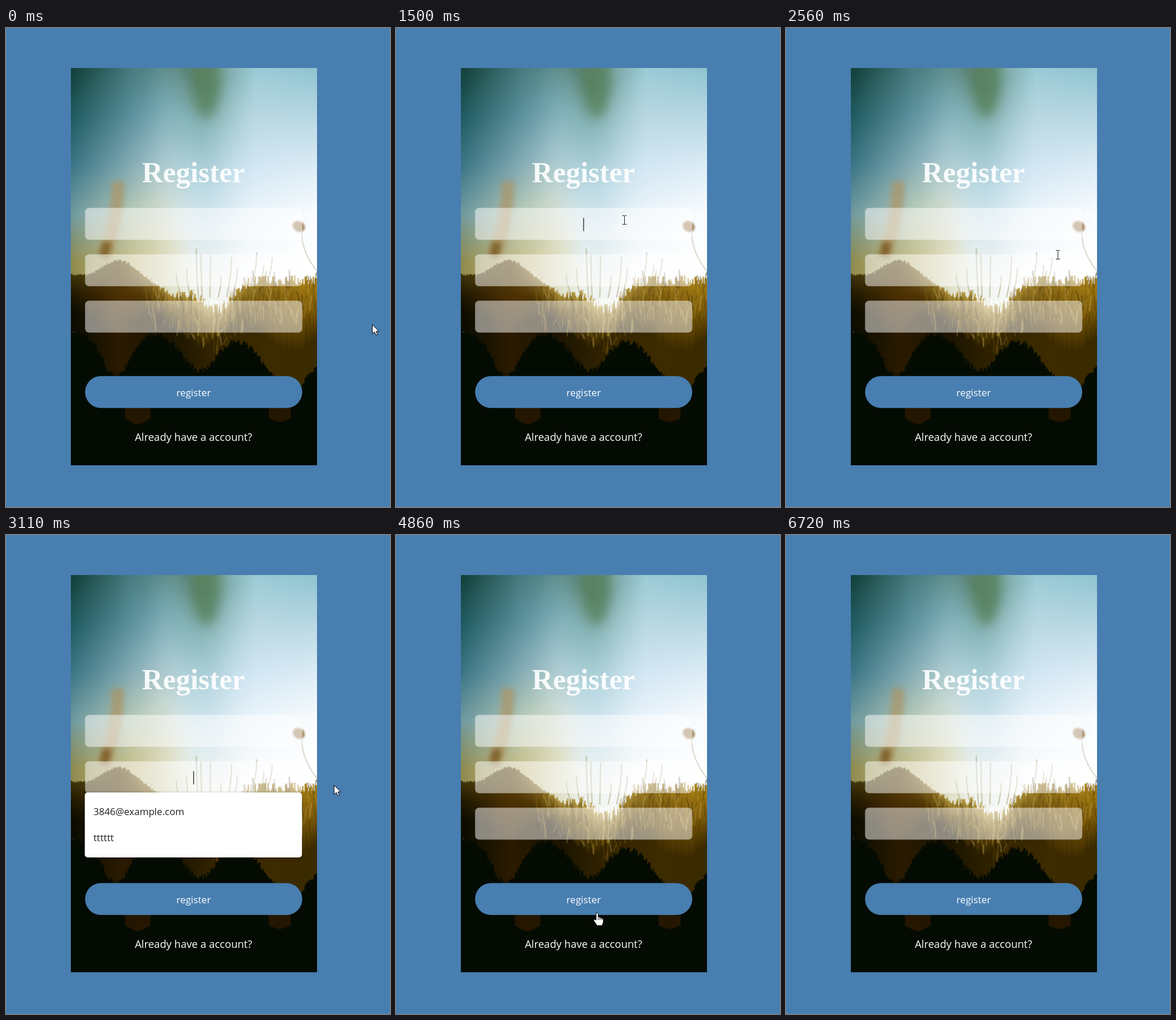
An HTML page with a canvas for the animation above (7.12 s loop, 663 by 826 pixels).

```html
<!DOCTYPE html>
<html lang="en">
<head>
<meta charset="utf-8">
<title>Register</title>
<style>
html, body { margin: 0; width: 100%; height: 100%; overflow: hidden; background: #487eb0; }
canvas { display: block; }
</style>
</head>
<body>
<canvas id="stage" width="663" height="826"></canvas>
<script>
const LOOP = 7120;
const SANS = '"Open Sans", "Noto Sans", sans-serif';
const BLUE = '#487eb0';
const PANEL = { x: 111.5, y: 69.25, w: 425, h: 685 };
const FIELD = { x: 136.5, y: 310.25, w: 375, h: 55, step: 80 };
const BUTTON = { x: 136.5, y: 600.25, w: 375, h: 55 };
const ctx = document.getElementById('stage').getContext('2d');

const home = { x: 632, y: 511 };
const moves = [
  { from: 430, to: 880, x: 394, y: 331 },
  { from: 1600, to: 2110, x: 517, y: 347 },
  { from: 2380, to: 2690, x: 440, y: 418 },
  { from: 2790, to: 3110, x: 566, y: 431 },
  { from: 3320, to: 3920, x: 424, y: 490 },
  { from: 4190, to: 4330, x: 528, y: 540 },
  { from: 4380, to: 4550, x: 350, y: 668 },
  { from: 4830, to: 4860, x: 347, y: 652 },
  { from: 4860, to: 5550, x: 372, y: 632 },
  { from: 5820, to: 5900, x: 398, y: 602 },
  { from: 6000, to: 6700, x: 680, y: 560 }
];
const fields = [
  { from: 1450, to: 2140, rows: ['acct', 'main', 'kq', 'eee', 'bylane', '1234509876'] },
  { from: 2700, to: 3130, rows: ['3846@example.com', 'tttttt'] },
  { from: 3540, to: 4350, rows: [] }
].map((f, i) => ({ ...f, y: FIELD.y + i * FIELD.step, popup: f.from + 100 }));
const hover = { from: 4860, to: 6000, time: 500 };

const clamp = v => Math.max(0, Math.min(1, v));
const smooth = v => { v = clamp(v); return v * v * (3 - 2 * v); };
const bump = (x, mid, width) => Math.exp(-(((x - mid) / width) ** 2));
const inside = (p, x, y, w, h) => p.x >= x && p.x <= x + w && p.y >= y && p.y <= y + h;
const isActive = (f, t) => t >= f.from && t < f.to;

function randomizer(seed) {
  return () => (seed = (seed * 16807) % 2147483647) / 2147483647;
}

function box(x, y, w, h, r, fill) {
  ctx.beginPath();
  ctx.roundRect(x, y, w, h, r);
  ctx.fillStyle = fill;
  ctx.fill();
}

function label(text, x, y, font, fill, align = 'center') {
  ctx.font = font;
  ctx.fillStyle = fill;
  ctx.textAlign = align;
  ctx.fillText(text, x, y);
}

// Colour at v (0..1) along evenly spaced hex stops
function ramp(stops, v) {
  const s = clamp(v) * (stops.length - 1);
  const i = Math.min(Math.floor(s), stops.length - 2);
  const channel = (hex, k) => parseInt(hex.slice(1 + 2 * k, 3 + 2 * k), 16);
  return '#' + [0, 1, 2].map(k => {
    const a = channel(stops[i], k);
    const b = channel(stops[i + 1], k);
    return Math.round(a + (b - a) * (s - i)).toString(16).padStart(2, '0');
  }).join('');
}

function column(c, x, top, bottom, colors) {
  const g = c.createLinearGradient(0, top, 0, bottom);
  colors.forEach((color, i) => g.addColorStop(i / (colors.length - 1), color));
  c.fillStyle = g;
}

function line(c, x, y, x2, y2, color, width) {
  c.strokeStyle = color;
  c.lineWidth = width;
  c.beginPath();
  c.moveTo(x, y);
  c.quadraticCurveTo(x, (y + y2) / 2, x2, y2);
  c.stroke();
}

// Each row runs left to right across the panel, rows run downwards
const sky = [
  ['#123f38', '#477c80', '#60887a', '#9bcbd6', '#8fc4d1'],
  ['#1f5a60', '#5d929f', '#8ab8bc', '#b9d8e2', '#b8d8e3'],
  ['#3a7585', '#86adb6', '#b5d6df', '#d3e7f4', '#dcecf6'],
  ['#6f9aa0', '#b7c9b4', '#d8e8ee', '#ecf5fb', '#fafdff'],
  ['#8f8a4c', '#c9c290', '#eef3ec', '#fcfdff', '#ffffff']
];

function paintSky(c) {
  for (let x = 0; x < PANEL.w; x++) {
    const dip = 35 * bump(x, 236, 45) - 30 * bump(x, 165, 40);
    const u = x / PANEL.w;
    column(c, x, dip, 335 + dip, sky.map(row => ramp(row, u)));
    c.fillRect(x, 0, 1, 440);
  }
  c.filter = 'blur(9px)';
  c.fillStyle = '#4f7a4ca0';
  c.beginPath();
  c.ellipse(235, 15, 24, 70, 0, 0, 7);
  c.fill();
  c.filter = 'blur(4px)';
  line(c, 82, 195, 58, 325, '#b2915ca0', 22);
  line(c, 62, 300, 56, 325, '#73531ac0', 16);
  c.filter = 'none';
}

const skyline = x => 365 - 34 * bump(x, 82, 42) - 8 * bump(x, 0, 25) + 24 * bump(x, 185, 45) + 48 * bump(x, 255, 34);
const lowline = x => 456 + 75 * bump(x, 78, 34) + 64 * bump(x, 222, 42) + 95 * bump(x, 380, 62);

function paintGround(c) {
  const rnd = randomizer(97);
  const crest = ['#40340a', '#5c4812', '#b09440', '#c7ab50', '#94741a', '#b08614'];
  const body = ['#201800', '#4a2e02', '#5c4308', '#70540c', '#6a4a08', '#7a5806'];
  const base = ['#0a0c00', '#2a1a00', '#1c1400', '#342500', '#3c2a00', '#3a2a00'];
  c.fillStyle = '#040b02';
  c.fillRect(0, 455, PANEL.w, 230);
  c.filter = 'blur(.7px)';
  for (let x = 0; x < PANEL.w; x += 2) {
    const u = x / PANEL.w;
    const rough = 4 + 14 * smooth((x - 140) / 60);
    const top = skyline(x) + (rnd() - 0.5) * rough;
    const bottom = lowline(x) + (rnd() - 0.5) * 10;
    column(c, x, top, bottom, [ramp(crest, u), ramp(body, u), ramp(base, u), ramp(base, u)]);
    c.fillRect(x, top, 2, bottom - top);
    const tail = 600 + 14 * bump(x, 115, 20) + 10 * bump(x, 360, 20);
    if (tail > 604) {
      c.fillStyle = '#241600';
      c.fillRect(x, 585, 2, tail - 585);
    }
  }
  c.filter = 'none';
}

function paintGrass(c) {
  const rnd = randomizer(4711);
  const tones = ['#a98830', '#6b4c08', '#2e2202', '#86661a', '#c8b058'];
  c.lineCap = 'round';
  c.globalAlpha = 0.4;
  for (let i = 0; i < 260; i++) {
    const x = 130 + rnd() * 300;
    const y = skyline(x) + 10 + rnd() * 70;
    const tone = tones[Math.floor(rnd() * tones.length)];
    line(c, x, y, x + (rnd() - 0.5) * 14, y - 8 - rnd() * 22, tone, 1 + rnd() * 2);
  }
  c.globalAlpha = 0.55;
  for (let i = 0; i < 12; i++) {
    const x = 180 + i * 15 + rnd() * 8;
    line(c, x, 305 + rnd() * 60, x + (235 - x) * 0.2, 395, '#8d8048', 1.5);
  }
  line(c, 399, 283, 426, 351, '#a99f80', 1.5);
  c.globalAlpha = 1;
  c.filter = 'blur(1.5px)';
  c.fillStyle = '#a98d68';
  c.beginPath();
  c.ellipse(394, 273, 11, 9, 0.5, 0, 7);
  c.fill();
  c.filter = 'none';
}

function makePhoto() {
  const cv = document.createElement('canvas');
  cv.width = PANEL.w;
  cv.height = PANEL.h;
  const c = cv.getContext('2d');
  paintSky(c);
  paintGround(c);
  paintGrass(c);
  return cv;
}
const photo = makePhoto();

function pointerAt(t) {
  let { x, y } = home;
  for (const m of moves) {
    const k = smooth((t - m.from) / (m.to - m.from));
    x += (m.x - x) * k;
    y += (m.y - y) * k;
  }
  return { x, y };
}

const popupHeight = f => f.rows.length * 45 + 22;
const hasPopup = (f, t) => f.rows.length && t >= f.popup && t < f.to;

function pointerKind(p, t) {
  if (fields.some(f => hasPopup(f, t) && inside(p, 136, f.y + 54, 375, popupHeight(f)))) return drawArrow;
  if (fields.some(f => inside(p, FIELD.x, f.y, FIELD.w, FIELD.h))) return drawBeam;
  if (inside(p, BUTTON.x, BUTTON.y, BUTTON.w, BUTTON.h)) return drawHand;
  return drawArrow;
}

function outline(d) {
  const shape = new Path2D(d);
  ctx.fillStyle = '#fff';
  ctx.strokeStyle = '#000';
  ctx.lineWidth = 1;
  ctx.lineJoin = 'round';
  ctx.fill(shape);
  ctx.stroke(shape);
}

function drawArrow() {
  outline('M.5 .5V16.5L4.3 13L6.8 18.6L9.4 17.5L7 12H11.8Z');
}

function drawBeam() {
  ctx.fillStyle = '#222';
  ctx.fillRect(0, -7, 1, 15);
  for (const y of [-8, 7]) {
    ctx.fillRect(-3, y, 3, 1);
    ctx.fillRect(1, y, 3, 1);
  }
}

function drawHand() {
  outline('M-1.5 12V1.5Q-1.5 -.5 .3 -.5Q2 -.5 2 1.5V7Q4.8 5.6 5.4 8Q8 7 8.6 9.2Q11 8.6 11 11V15.5L8.8 21.5H.2L-5.6 13.2Q-6.3 11 -4.3 10.8Z');
  ctx.beginPath();
  for (let x = 2; x < 9; x += 3.2) {
    ctx.moveTo(x, 8);
    ctx.lineTo(x, 12);
  }
  ctx.stroke();
}

function drawField(f, t) {
  box(FIELD.x, f.y, FIELD.w, FIELD.h, 7, 'rgba(255,255,255,.5)');
  if (isActive(f, t) && (t - f.from) % 1000 < 500) {
    ctx.fillStyle = '#222';
    ctx.fillRect(323.3, f.y + 17, 1.3, 23);
  }
}

function drawPopup(f, t) {
  if (!hasPopup(f, t)) return;
  const y = Math.floor(f.y) + 54;
  ctx.save();
  ctx.globalAlpha = clamp((t - f.popup) / 150);
  ctx.shadowColor = 'rgba(0,0,0,.28)';
  ctx.shadowBlur = 5;
  ctx.shadowOffsetY = 1;
  box(136, y, 375, popupHeight(f), 5, '#fff');
  ctx.shadowColor = 'transparent';
  f.rows.forEach((row, i) => label(row, 151, y + 39 + i * 45, `16.6px ${SANS}`, '#222', 'left'));
  ctx.restore();
}

function drawButton(t) {
  const k = smooth((t - hover.from) / hover.time) - smooth((t - hover.to) / hover.time);
  const s = 1 - 0.04 * k;
  const { x, y, w, h } = BUTTON;
  ctx.save();
  ctx.translate(x + w / 2, y + h / 2);
  ctx.scale(s, s);
  box(-w / 2, -h / 2, w, h, h / 2, BLUE);
  label('register', 0, 7.25, `16.8px ${SANS}`, '#fff');
  ctx.restore();
}

function draw(t) {
  ctx.fillStyle = BLUE;
  ctx.fillRect(0, 0, 663, 826);
  ctx.drawImage(photo, PANEL.x, PANEL.y);
  label('Register', 323.7, 266, 'bold 50px "Liberation Serif", "Times New Roman", serif', 'rgba(255,255,255,.9)');
  fields.forEach(f => drawField(f, t));
  drawButton(t);
  label('Already have a account?', 323.7, 712, `18.1px ${SANS}`, '#fff');
  fields.forEach(f => drawPopup(f, t));

  const p = pointerAt(t);
  ctx.save();
  ctx.translate(Math.round(p.x), Math.round(p.y));
  pointerKind(p, t)();
  ctx.restore();
}

const start = performance.now();
function tick() {
  draw((performance.now() - start) % LOOP);
  requestAnimationFrame(tick);
}
tick();
</script>
</body>
</html>
```
